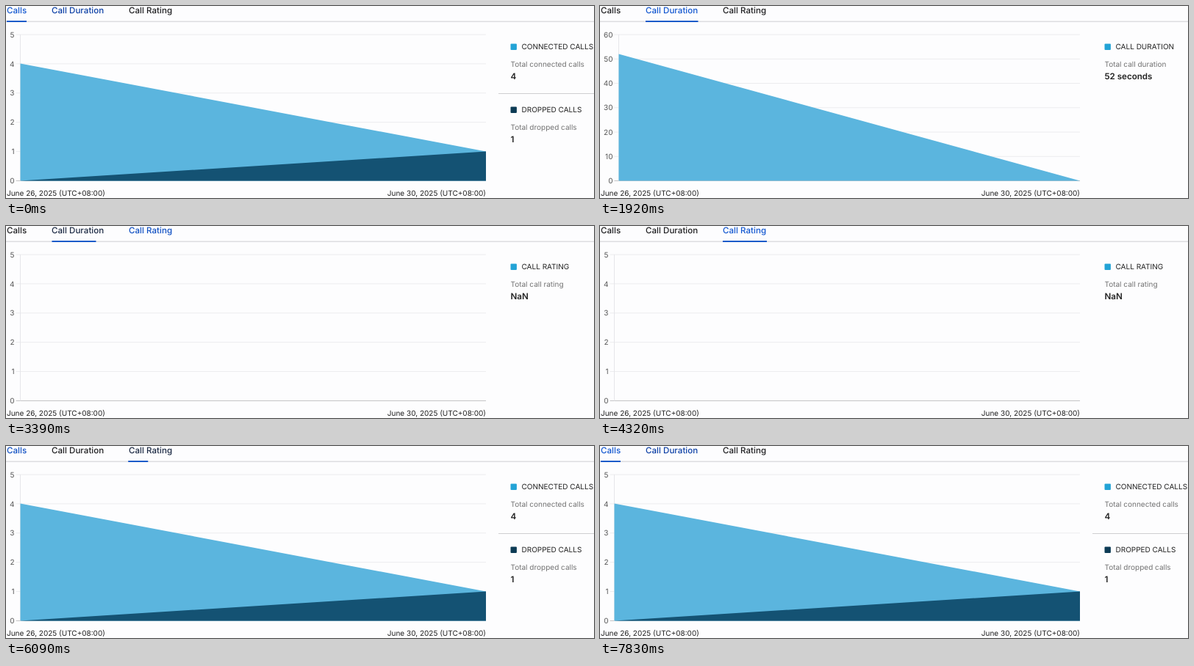
An HTML page for the animation above (7860 ms loop, 800x262 px).

```html
<!DOCTYPE html>
<html lang="en">
<head>
<meta charset="utf-8">
<title>Call statistics</title>
<style>
  html, body { margin: 0; width: 100%; height: 100%; overflow: hidden; background: #fdfdfe; }
  svg { display: block; }
  text { font: 10px Inter, sans-serif; fill: #222; text-rendering: geometricPrecision; }
  .tab { font-size: 11.6px; font-weight: 500; }
  .axis { fill: #555; text-anchor: end; }
  .note { fill: #737373; }
  .value { font-size: 11.6px; font-weight: 600; }
  .end { text-anchor: end; }
</style>
</head>
<body>
<svg id="stage" width="800" height="262" viewBox="0 0 800 262"></svg>
<script>
const LOOP = 7860, SLIDE = 300, FADE = 45;
const TOP = 39, BASE = 238.5, RIGHT = 653;
const LIGHT = '#5bb5de', DARK = '#145273';
const TEXT = [31, 31, 33], HOVER = [13, 64, 166], ACTIVE = [18, 87, 208];

const tabs = [
  { label: 'Calls', x: 1, width: 27,
    colors: [[0, ACTIVE], [645, TEXT], [5040, HOVER], [6060, ACTIVE]] },
  { label: 'Call Duration', x: 62, width: 71.5,
    colors: [[0, HOVER], [645, ACTIVE], [3355, TEXT], [4800, HOVER], [5010, TEXT], [7080, HOVER]] },
  { label: 'Call Rating', x: 167, width: 60,
    colors: [[0, TEXT], [2490, HOVER], [3360, ACTIVE], [6055, TEXT]] }
];
const clicks = [[645, 0, 1], [3360, 1, 2], [6060, 2, 0]];

const text = (x, y, label, type = '') => `<text x="${x}" y="${y}" class="${type}">${label}</text>`;
const line = (x1, y1, x2, y2, color, width = 1) =>
  `<path d="M${x1} ${y1}L${x2} ${y2}" stroke="${color}" stroke-width="${width}"/>`;
const area = (points, color) => `<polygon points="${points}" fill="${color}"/>`;

function grid(left, max, step) {
  let out = '';
  for (let v = 0; v <= max; v += step) {
    const y = BASE - v / max * (BASE - TOP);
    out += line(left - 6, y, RIGHT, y, v ? '#ececee' : '#c4c4c6') + text(left - 8, y + 3.6, v, 'axis');
  }
  return out + line(left, TOP, left, BASE, '#e6e6ea');
}

const legend = (y, color, title, note, value) =>
  `<rect x="686.5" y="${y - 4.2}" width="8.4" height="8.4" rx="1" fill="${color}"/>` +
  text(701.5, y + 3.6, title) + text(686.5, y + 27.6, note, 'note') + text(686.5, y + 44.2, value, 'value');

const panels = [
  grid(19.5, 5, 1) +
    area(`19.5,${BASE} 19.5,78.5 ${RIGHT},198.5 ${RIGHT},${BASE}`, LIGHT) +
    area(`19.5,${BASE} ${RIGHT},198.5 ${RIGHT},${BASE}`, DARK) +
    legend(55.8, '#22a3d6', 'CONNECTED CALLS', 'Total connected calls', 4) +
    line(670, 119.5, 800, 119.5, '#cfcfd1') +
    legend(141.8, '#0d3b55', 'DROPPED CALLS', 'Total dropped calls', 1),
  grid(25.5, 60, 10) +
    area(`25.5,${BASE} 25.5,65.6 ${RIGHT},${BASE}`, LIGHT) +
    legend(55.8, '#22a3d6', 'CALL DURATION', 'Total call duration', '52 seconds'),
  grid(19.5, 5, 1) +
    legend(55.8, '#22a3d6', 'CALL RATING', 'Total call rating', 'NaN')
];

const stage = document.getElementById('stage');
stage.innerHTML =
  line(0, 21.3, 800, 21.3, '#dddde1', 1.4) +
  '<rect id="bar" y="20" height="2"/>' +
  tabs.map(t => text(t.x, 9.9, t.label, 'tab')).join('') +
  panels.map(p => `<g class="panel">${p}</g>`).join('') +
  text(1, 259.4, 'June 26, 2025 (UTC+08:00)') +
  text(RIGHT, 259.4, 'June 30, 2025 (UTC+08:00)', 'end');

const bar = document.getElementById('bar');
const labels = stage.querySelectorAll('.tab');
const groups = stage.querySelectorAll('.panel');
bar.setAttribute('fill', '#1c5bc9');

const clamp = v => Math.max(0, Math.min(1, v));
const mix = (a, b, p) => a + (b - a) * p;
const ease = p => p < .5 ? 4 * p ** 3 : 1 - 4 * (1 - p) ** 3;

function colorAt(keys, t) {
  const i = keys.findLastIndex(k => k[0] <= t);
  const [start, color] = keys[i];
  const before = keys[Math.max(0, i - 1)][1];
  const p = clamp((t - start) / FADE);
  return `rgb(${color.map((c, n) => Math.round(mix(before[n], c, p)))})`;
}

function draw(t) {
  const [start, from, to] = clicks.findLast(c => c[0] <= t) || [-SLIDE, 0, 0];
  const p = ease(clamp((t - start) / SLIDE));
  bar.setAttribute('x', mix(tabs[from].x, tabs[to].x, p));
  bar.setAttribute('width', tabs[to].width);
  groups.forEach((g, i) => g.style.display = i === to ? '' : 'none');
  labels.forEach((el, i) => el.style.fill = colorAt(tabs[i].colors, t));
}

function tick() {
  draw(performance.now() % LOOP);
  requestAnimationFrame(tick);
}
tick();
</script>
</body>
</html>
```
